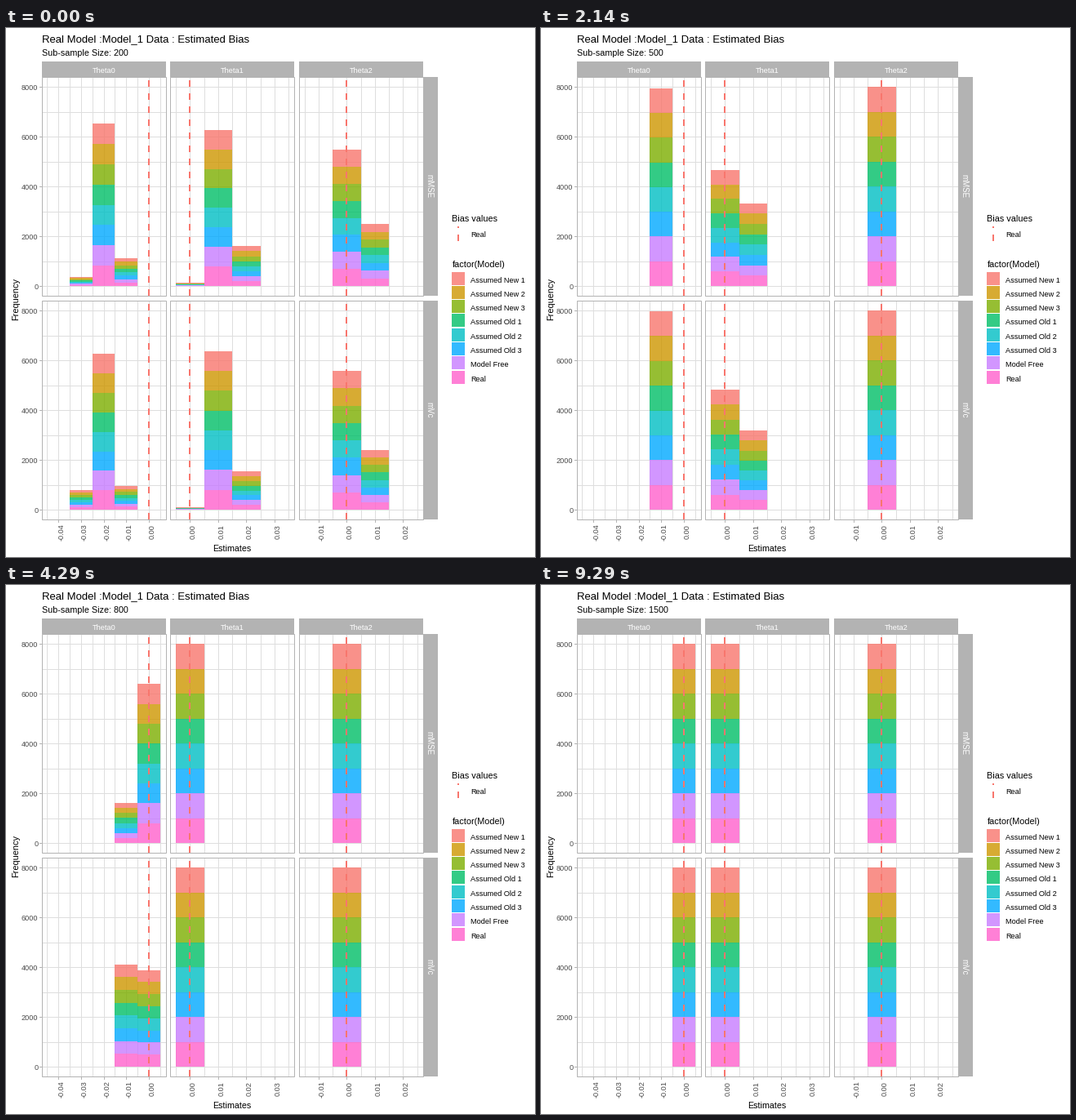
Animation of 648 by 648 pixels, one loop 10 s. Source, as a matplotlib script:

```python
import math
import numpy as np
import matplotlib.pyplot as plt
from matplotlib.animation import FuncAnimation
from matplotlib.patches import Rectangle

SIDE, DPI = 648, 100
FRAMES, LOOP = 100, 10000
PT = 72 / DPI
STRIP, GRID, DARK, DASH = "#B3B3B3", "#DEDEDE", "#4D4D4D", "#F8766D"
MODELS = ["Assumed New 1", "Assumed New 2", "Assumed New 3", "Assumed Old 1",
          "Assumed Old 2", "Assumed Old 3", "Model Free", "Real"]
FILLS = ["#F8766D", "#CD9600", "#7CAE00", "#00BE67",
         "#00BFC4", "#00A9FF", "#C77CFF", "#FF61CC"]
SIZES = range(200, 1501, 100)
RUNS = 8000
PER_K = 30.45                      # pixels per 1000 counts

# left, first bin edge, bin width, first bin, number of bins
COLS = [(44, 50.5, 27.64, -4, 5), (201, 208, 34.55, 0, 4), (359, 365.5, 34.55, -1, 4)]
ROWS = [(60, 316, "mMSE"), (334, 590, "mVc")]
PANEL_W, PANEL_H = 152, 268

# Bias at size 200 in bin widths: mean, spread, decay power of the mean
BIAS = {
    "mMSE": [(-1.89, .36, 1.02), (1.22, .332, 1.015), (.351, .304, .96)],
    "mVc": [(-1.98, .405, .99), (1.225, .316, 1.027), (.335, .313, 1.2)],
}
SPREAD_POWER = 1.45

plt.rcParams["font.family"] = "Liberation Sans"
fig = plt.figure(figsize=(SIDE / DPI, SIDE / DPI), dpi=DPI, facecolor="white")
ax = fig.add_axes([0, 0, 1, 1])
ax.set_xlim(0, SIDE)
ax.set_ylim(SIDE, 0)
ax.axis("off")


def text(x, y, s, px, color="black", ha="left", rot=0):
    return ax.text(x, y, s, fontsize=px * PT, color=color, ha=ha, va="baseline",
                   rotation=rot, rotation_mode="anchor", zorder=6)


def box(x0, y0, x1, y1, color, alpha=1, z=2):
    return ax.add_patch(Rectangle((x0, y0), x1 - x0, y1 - y0, fc=color, ec="none",
                                  lw=0, alpha=alpha, zorder=z))


def dashed(x, bottom, top):
    ax.plot([x, x], [bottom, top], color=DASH, lw=2 * PT, ls=(0, (4, 4)),
            dash_capstyle="butt", zorder=4)


def draw_panel(col, row):
    left, edge, step, first, n = col
    top, base, _ = row
    right, bottom = left + PANEL_W, top + PANEL_H
    for j in range(2 * n + 1):
        x = round(edge + j * step / 2)
        box(x, top, x + 1, bottom, GRID, z=1)
    for k in range(9):
        y = round(base - k * PER_K)
        box(left, y, right, y + 1, GRID, z=1)
    ax.add_patch(Rectangle((left + .5, top + .5), PANEL_W, PANEL_H, fill=False,
                           ec=STRIP, lw=PT, snap=False, zorder=5))
    dashed(round(edge + (.5 - first) * step), bottom, top)


def draw_frame():
    text(44, 17, "Real Model :Model_1 Data : Estimated Bias", 13.15)
    text(277, 641, "Estimates", 10.6, ha="center")
    text(15.5, 332, "Frequency", 11, ha="center", rot=90)

    for i, col in enumerate(COLS):
        left, edge, step, first, n = col
        box(left, 41, left + PANEL_W, 60, STRIP)
        text(left + 76, 55, f"Theta{i}", 9.1, "white", "center")
        for j in range(n):
            x = round(edge + (j + .5) * step)
            box(x, 603, x + 1, 606, STRIP)
            text(x + 6.5, 617.5, f"{(first + j) / 100:.2f}", 9.2, DARK, "center", 90)
        for row in ROWS:
            draw_panel(col, row)

    for top, base, name in ROWS:
        box(511, top, 529, top + PANEL_H, STRIP)
        text(515.5, top + 134, name, 9.8, "white", "center", -90)
        for k in range(0, 9, 2):
            y = round(base - k * PER_K)
            box(41, y, 44, y + 1, STRIP)
            text(39.3, y + 4, str(k * 1000), 9.1, DARK, "right")

    text(546, 237, "Bias values", 10.9)
    dashed(554, 260.5, 242.5)
    text(569, 256, "Real", 9.2)
    text(546.5, 293, "factor(Model)", 10.9)
    for i, (name, fill) in enumerate(zip(MODELS, FILLS)):
        y = int(299.1 + 17.28 * i)
        box(546, y, 562, y + 16, fill, .8)
        text(569, y + 13, name, 9.2)


def bin_count(k, size, mean, spread, power):
    """Runs whose normally distributed bias falls in bin k at this sample size."""
    shrink = SIZES[0] / size
    mu, sd = mean * shrink ** power, spread * shrink ** SPREAD_POWER
    lo, hi = (math.erf((k + d - mu) / (sd * math.sqrt(2))) for d in (-.5, .5))
    return RUNS * (hi - lo) / 2


def stack(x0, x1, base, count):
    """Draw one stacked bar, split evenly over the models."""
    edges = np.rint(base - np.linspace(0, count, len(FILLS) + 1) * PER_K / 1000)
    return [box(x0, hi, x1, lo, fill, .8)
            for lo, hi, fill in zip(edges, edges[1:], FILLS[::-1]) if lo > hi]


draw_frame()
subtitle = text(44, 34, "", 10.75)
bars = []


def update(i):
    while bars:
        bars.pop().remove()
    size = SIZES[math.ceil((i + 1) * len(SIZES) / FRAMES) - 1]
    subtitle.set_text(f"Sub-sample Size: {size}")
    for _, base, name in ROWS:
        for (_, edge, step, first, n), bias in zip(COLS, BIAS[name]):
            for j in range(n):
                count = bin_count(first + j, size, *bias)
                if count > 50:
                    x = edge + j * step
                    bars.extend(stack(round(x), round(x + step), base, count))
    return bars + [subtitle]


anim = FuncAnimation(fig, update, frames=FRAMES, interval=LOOP / FRAMES,
                     repeat=True, repeat_delay=0, blit=False)
plt.show()
```
